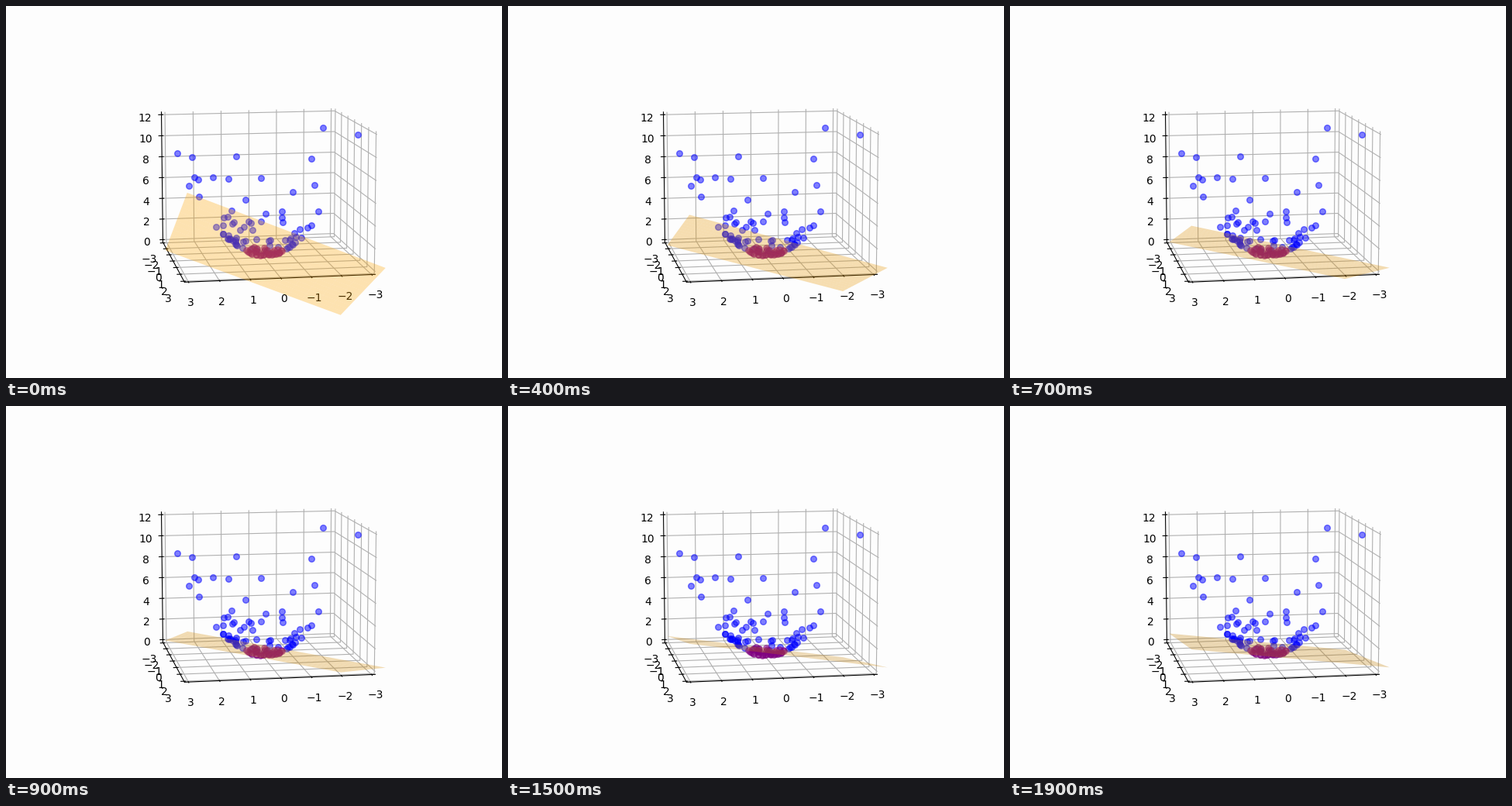
A matplotlib script that plays this animation: 640 px wide and 480 px high, repeating every 2 s.

```python
import matplotlib.pyplot as plt
import numpy as np
from matplotlib.animation import FuncAnimation

W, H, DPI = 640, 480, 100
FRAMES, STEP = 20, 100
PAPER = "#fdfdfd"
ELEV, AZIM = 10, 80
ORANGE = np.array([1, 0.647, 0])

# Points high on the bowl: (to the right, towards the viewer).
HIGH = [
    (-2.86, 1.31), (-2.33, 2.10), (-0.99, -2.65), (2.08, -2.54),
    (3.07, 1.48), (1.67, -2.27), (-2.40, -0.97), (-2.16, 1.76),
    (-2.51, 0.60), (-1.79, -1.78), (-1.15, 2.62), (-0.11, -2.45),
    (1.76, -1.62), (1.01, -1.97), (-2.17, 1.10), (-0.66, -1.93),
]

fig = plt.figure(figsize=(W / DPI, H / DPI), dpi=DPI, facecolor=PAPER)
ax = fig.add_subplot(projection="3d", computed_zorder=False, facecolor=PAPER)
ax.view_init(elev=ELEV, azim=AZIM)
ax.set(xlim=(-3.125, 3.125), ylim=(-3.125, 3.125), zlim=(-0.25, 12.25))
for axis in (ax.xaxis, ax.yaxis, ax.zaxis):
    axis.set_pane_color(PAPER)


def bowl(right, near, color):
    """Scatter points, given in view directions, on z = x^2 + y^2."""
    s, c = np.sin(np.radians(AZIM)), np.cos(np.radians(AZIM))
    x, y = c * near - s * right, s * near + c * right
    ax.scatter(x, y, x ** 2 + y ** 2, s=30, color=color, alpha=0.5,
               depthshade=False, zorder=2)


def ring(r):
    a = rng.uniform(0, 2 * np.pi, r.size)
    return r * np.cos(a), r * np.sin(a)


# Squared radii of normal data are exponential; keep the lower outer part.
rng = np.random.default_rng(4)
low = ring(np.sqrt(-2 * np.log(rng.uniform(np.exp(-2.2), np.exp(-0.42), 58))))
bowl(*np.array(HIGH).T, "blue")
bowl(*low, "blue")
bowl(*ring(0.64 * np.sqrt(rng.uniform(0, 1, 42))), "purple")

side = np.arange(-3.5, 3.5, 0.5)
gx, gy = np.meshgrid(side, side)
surface = None


def plane(k):
    """Slopes and offset of the separating plane after k training steps."""
    w = 1 + 0.0715 * k
    sx = 1.106 * (1 - 0.0138 * k) / w
    sy = 1.335 * (1 - 0.0165 * k - 0.0003 * k * k) / w
    c = (0.077 + 0.03 * k + 0.0014 * k * k) / w
    return sx, sy, c


def draw(k):
    global surface
    if surface is not None:
        surface.remove()
    sx, sy, c = plane(k)
    light = min(1, 0.68 + 0.18 * np.hypot(sx, sy))  # steeper is brighter
    surface = ax.plot_surface(gx, gy, sx * gx + sy * gy + c, shade=False,
                              color=ORANGE * light, alpha=0.3, zorder=3)
    return [surface]


anim = FuncAnimation(fig, draw, frames=FRAMES, interval=STEP,
                     init_func=lambda: draw(0), repeat=True, repeat_delay=0)
plt.show()
```
